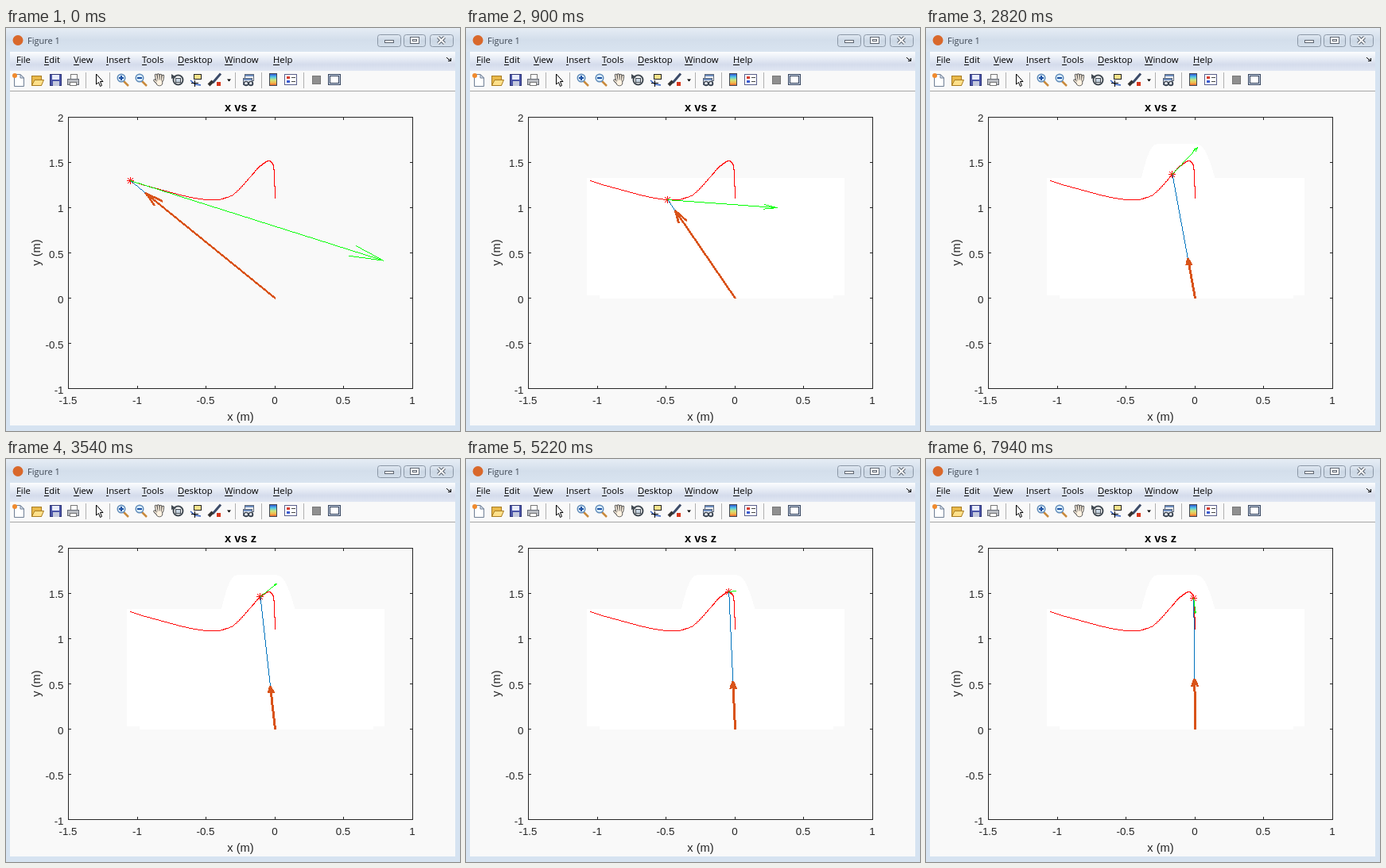
An HTML page with a canvas for the animation above (8000 ms loop, 571 by 508 pixels).

```html
<!DOCTYPE html>
<html lang="en">
<head>
<meta charset="utf-8">
<title>Figure 1</title>
<style>
  html, body { margin: 0; width: 100%; height: 100%; overflow: hidden; background: #d6e3f1; }
  canvas { display: block; }
</style>
</head>
<body>
<canvas id="stage" width="571" height="508"></canvas>
<script>
const W = 571, H = 508, LOOP = 8000;
const RED = '#f00', GREEN = '#0f0', BLUE = '#0072bd', ORANGE = '#d95319', INK = '#262626';
const UX = 173.2, UY = 114.2;            // pixels per metre
const OX = 338, OY = 340;                // data origin
const stage = document.getElementById('stage').getContext('2d');
let g = stage;

// ---------- drawing helpers ----------
function rect(c, x, y, w, h) { g.fillStyle = c; g.fillRect(x, y, w, h); }

function frame(c, x, y, w, h) {
  g.strokeStyle = c; g.lineWidth = 1;
  g.strokeRect(x + .5, y + .5, w - 1, h - 1);
}

function box(fill, edge, x, y, w, h) { rect(fill, x, y, w, h); frame(edge, x, y, w, h); }

function poly(pts, fill, stroke, width = 1, open = false) {
  g.beginPath();
  for (let i = 0; i < pts.length; i += 2) g.lineTo(pts[i], pts[i + 1]);
  if (!open) g.closePath();
  if (fill) { g.fillStyle = fill; g.fill(); }
  if (stroke) { g.strokeStyle = stroke; g.lineWidth = width; g.stroke(); }
}

function disc(x, y, r, fill, stroke, width = 1) {
  g.beginPath(); g.arc(x, y, r, 0, 7);
  if (fill) { g.fillStyle = fill; g.fill(); }
  if (stroke) { g.strokeStyle = stroke; g.lineWidth = width; g.stroke(); }
}

function text(s, x, y, font, c = INK, align = 'left') {
  g.font = font; g.fillStyle = c; g.textAlign = align;
  g.fillText(s, x, y);
}

function shade(y0, y1, ...stops) {
  const s = g.createLinearGradient(0, y0, 0, y1);
  stops.forEach((c, i) => s.addColorStop(i / (stops.length - 1), c));
  return s;
}

// hard-edged line, thickened across its minor axis
function line(c, x0, y0, x1, y1, w = 1) {
  const dx = x1 - x0, dy = y1 - y0, flat = Math.abs(dx) >= Math.abs(dy);
  const n = Math.max(1, Math.ceil(Math.max(Math.abs(dx), Math.abs(dy)))), o = w >> 1;
  g.fillStyle = c;
  for (let i = 0; i <= n; i++) {
    const x = Math.round(x0 + dx * i / n), y = Math.round(y0 + dy * i / n);
    if (flat) g.fillRect(x, y - o, 1, w); else g.fillRect(x - o, y, w, 1);
  }
}

// arrow whose head is square to the shaft in data units
function arrow(c, x, y, dx, dy, size, w) {
  const tx = x + dx, ty = y + dy, u = dx / UX, v = dy / UY;
  line(c, x, y, tx, ty, w);
  for (const s of [-.25, .25])
    line(c, tx, ty, tx - size * (u + s * v) * UX, ty - size * (v - s * u) * UY, w);
}

// ---------- motion ----------
// monotone cubic through [x, y] points
function curve(pts) {
  const last = pts.length - 1;
  const secant = i => (pts[i + 1][1] - pts[i][1]) / (pts[i + 1][0] - pts[i][0]);
  const slope = i => {
    if (i === 0) return secant(0);
    if (i === last) return secant(last - 1);
    const a = secant(i - 1), b = secant(i);
    return a * b <= 0 ? 0 : 2 * a * b / (a + b);
  };
  return x => {
    let i = 0;
    while (i < last - 1 && x > pts[i + 1][0]) i++;
    const [x0, y0] = pts[i], [x1, y1] = pts[i + 1];
    const h = x1 - x0, s = (x - x0) / h, q = 1 - s;
    return y0 * q * q * (1 + 2 * s) + y1 * s * s * (3 - 2 * s)
         + h * s * q * (slope(i) * q - slope(i + 1) * s);
  };
}

const pathY = curve([[156, 192], [180, 199.6], [262, 216.4], [283, 211], [291, 204.6],
  [309.5, 184], [320.5, 172.6], [331, 167], [336, 173.5], [338.2, 215]]);

const falling = (n, mid, width) => 1 / (1 + Math.exp((n - mid) / width));

// the gap to the goal decays, faster at first
const gap = n => 124.4 * Math.exp(-.061 * n + .0648 * Math.log1p(Math.exp((10.6 - n) / 1.8)));
const decay = n => .061 + .036 * falling(n, 10.6, 1.8);
const reach = n => .275 + .0016 * n + .62 * falling(n, 14.4, 1.96);

function pose(n) {
  const x = 338.2 - gap(n), y = pathY(x), e = .05;
  const vx = 18 * gap(n) * decay(n);
  return { x, y, vx, vy: vx * (pathY(x + e) - pathY(x - e)) / (2 * e) };
}

// [start, first step, interval]
const TEMPO = [[-60, 0, 120], [3300, 28, 60], [3420, 30, 120], [7640, 65, 100]];
function stepAt(t) {
  const [start, first, interval] = TEMPO.findLast(p => t >= p[0]);
  return first + Math.floor((t - start) / interval);
}

// ---------- window ----------
function titleBar() {
  rect('#d6e3f1', 0, 0, W, H);
  rect(shade(0, 30, '#e6edf5', '#d3deeb', '#d9e4f0'), 0, 0, W, 30);
  disc(15, 15.5, 6.5, '#d9682b');
  text('Figure 1', 27, 20, '11px "Open Sans", sans-serif', '#3f4854');
  for (const [x, w] of [[467, 30], [500, 28], [533, 30]]) {
    g.beginPath(); g.roundRect(x + .5, 8.5, w - 1, 15, 3);
    g.fillStyle = shade(8, 24, '#e3ebf4', '#cbd7e4', '#d5e0ec'); g.fill();
    g.strokeStyle = '#8b97a6'; g.lineWidth = 1; g.stroke();
  }
  box('#fff', '#5c6470', 476, 15, 12, 4);
  box('#fff', '#5c6470', 508, 11, 12, 9);
  frame('#5c6470', 511, 14, 6, 3);
  for (const [c, w] of [['#5c6470', 4], ['#fff', 2]])
    for (const s of [-4, 4]) poly([547.5 - s, 11.5, 547.5 + s, 19.5], null, c, w, true);
}

function menuBar() {
  rect(shade(30, 54, '#fcfdfe', '#e8edf6', '#d5dcec', '#e1e7f3'), 5, 30, 560, 24);
  const names = { File: 13, Edit: 48, View: 85, Insert: 126, Tools: 171, Desktop: 216, Window: 275, Help: 336 };
  for (const [s, x] of Object.entries(names)) {
    text(s, x, 44, '11.3px "Open Sans", sans-serif', '#000');
    rect('#000', x, 46, Math.round(g.measureText(s[0]).width), 1);
  }
  line('#000', 554, 37, 559, 41);
  rect('#000', 556, 41, 4, 1); rect('#000', 559, 38, 1, 4);
}

function magnifier(x, plus) {
  poly([x + 9, 67, x + 15, 73], null, '#c98a3c', 2.5, true);
  disc(x + 6, 63, 4.8, '#d8ecfb', '#5b87b5', 1.4);
  rect('#1b4fa0', x + 3, 62, 6, 2);
  if (plus) rect('#1b4fa0', x + 5, 60, 2, 6);
}

function hand(x, y) {
  g.lineCap = 'round';
  for (const [c, w] of [['#4b4b4b', 3.4], ['#fff3e2', 1.6]]) {
    for (let i = 0; i < 4; i++)
      poly([x - 3 + i * 2.2, y, x - 4.5 + i * 3, y - 6 - Math.sin(i + .6)], null, c, w, true);
    poly([x - 2, y + 4, x - 6, y], null, c, w, true);
    disc(x, y + 3, 2.6 + w / 2, c);
  }
  g.lineCap = 'butt';
}

function toolBar() {
  rect('#f9f9f9', 5, 54, 560, 447);
  rect('#a6a6a6', 5, 79, 560, 1);
  for (const x of [100, 130, 288, 321, 374]) rect('#b0b0b0', x, 56, 1, 20);

  // new, open, save, print
  poly([10.5, 58.5, 18, 58.5, 22.5, 63, 22.5, 73.5, 10.5, 73.5], '#fff', '#6f7f95');
  poly([18, 58.5, 18, 63, 22.5, 63], '#dce5f0', '#6f7f95');
  disc(11, 60, 3, '#f08a2c');
  box('#e9b94a', '#a87c22', 32, 60, 13, 13);
  poly([32.5, 72.5, 36, 65.5, 47.5, 65.5, 44.5, 72.5], '#ffe08a', '#a87c22');
  box('#4b55a8', '#2d3475', 55, 58, 15, 15);
  rect('#e8ecfa', 58, 59, 9, 6); rect('#c4c9dc', 59, 67, 8, 6);
  box('#fff', '#777', 81, 58, 9, 7);
  box('#b9bcc2', '#666b75', 77, 64, 15, 8);
  box('#fff', '#777', 80, 68, 9, 5);

  // pointer, zoom, pan
  poly([113.5, 58, 113.5, 71, 116.5, 68.5, 118.5, 73.5, 120.5, 72.5, 118.5, 67.5, 122, 67.5], '#fff', '#000');
  magnifier(139, true);
  magnifier(162, false);
  hand(193, 66);

  // rotate
  disc(216.5, 65.5, 6, null, '#424a52', 2);
  poly([208, 58, 208, 64, 214, 62], '#424a52');
  box('#c9d6e2', '#424a52', 213, 63, 7, 6);

  // data cursor
  box('#f7e38a', '#222', 236, 58, 10, 7);
  poly([232, 66, 238, 71, 245, 72], null, '#2b57b8', 1.4, true);
  rect('#000', 233, 69, 9, 1); rect('#000', 237, 66, 1, 8);

  // brush
  poly([270, 57.5, 260, 69], null, '#3c4b68', 3, true);
  poly([255, 72, 260, 67], null, '#333', 4, true);
  rect('#d5361b', 265, 68, 5, 5);
  poly([278, 64.5, 283, 64.5, 280.5, 67.5], '#000');

  // link
  for (const [x, y] of [[300, 58], [298, 63]]) {
    box('#f4f7fb', '#5a6577', x, y, 12, 9);
    rect('#6f8fc0', x + 1, y + 1, 10, 2);
  }
  for (const x of [302, 308]) disc(x, 70, 2.6, null, '#3b4450', 1.4);

  // colour bar and legend
  box(shade(58, 73, '#3558d4', '#4fc5e8', '#c8e47c', '#f6b84a', '#e0482e'), '#3f4550', 331, 57, 10, 16);
  box('#fff', '#5a5f8a', 350, 58, 16, 14);
  for (const [c, y] of [['#d63c2c', 61], ['#3b5bd0', 66]]) {
    rect(c, 353, y, 4, 3); rect('#444', 359, y + 1, 5, 1);
  }

  // hide and show tools
  box('#8f8f8f', '#777', 385, 60, 11, 11);
  box('#c9d5e6', '#35435c', 405, 58, 16, 14);
  box('#fff', '#35435c', 407, 60, 12, 10);
}

function axes() {
  const face = 'px "Liberation Sans", Arial, sans-serif';
  const small = 13.33 + face, label = 14.67 + face, tick = 3;
  frame(INK, 78, 112, 434, 343);
  for (let i = 0; i < 6; i++) {
    const x = Math.round(78 + i * 86.6);
    rect(INK, x, 454 - tick, 1, tick); rect(INK, x, 113, 1, tick);
    text(String(-1.5 + i / 2), x, 474, small, INK, 'center');
  }
  for (let i = 0; i < 7; i++) {
    const y = Math.round(112 + i * 57);
    rect(INK, 79, y, tick, 1); rect(INK, 511 - tick, y, tick, 1);
    text(String(2 - i / 2), 72.5, Math.round(118 + i * 57.17), small, INK, 'right');
  }
  text('x vs z', 295, 105, 'bold ' + label, '#000', 'center');
  text('x (m)', 295, 495, label, INK, 'center');
  g.save();
  g.translate(43, 283); g.rotate(-Math.PI / 2);
  text('y (m)', 0, 0, label, INK, 'center');
  g.restore();
}

// ---------- plot ----------
// white area uncovered as the arrows sweep
function swept(step) {
  if (!step) return;
  rect('#fff', 152, 189, 324, 148);
  rect('#fff', 168, 337, 294, 4);
  let top = 189;
  for (let n = 0; n <= step; n++) {
    const p = pose(n);
    top = Math.min(top, Math.round(p.y + p.vy) - 1);
  }
  for (let y = Math.max(top, 146); y < 189; y++) {
    const r = Math.sqrt(y - 146), left = Math.round(290 - 2.9 * r);
    rect('#fff', left, y, Math.round(341 + 3.4 * r) - left, 1);
  }
}

function trajectory() {
  let a = pose(0);
  for (let n = .25; n < 130; n += .25) {
    const b = pose(n);
    line(RED, a.x, a.y, b.x, b.y);
    a = b;
  }
}

function star(x, y) {
  line(RED, x - 4, y, x + 4, y);
  line(RED, x, y - 4, x, y + 4);
  for (const s of [-3, 3]) line(RED, x - 3, y - s, x + 3, y + s);
}

function plot(step) {
  const { x, y, vx, vy } = pose(step);
  const dx = (x - OX) * reach(step), dy = (y - OY) * reach(step);
  star(Math.round(x), Math.round(y));
  line(BLUE, OX, OY, x, y);
  arrow(ORANGE, OX, OY, dx, dy, .18 - .055 * Math.hypot(dx / UX, dy / UY), 3);
  arrow(GREEN, x, y, vx, vy, .12, 1);
}

function layer(...parts) {
  const c = document.createElement('canvas');
  c.width = W; c.height = H;
  g = c.getContext('2d');
  parts.forEach(part => part());
  g = stage;
  return c;
}

const back = layer(titleBar, menuBar, toolBar);
const front = layer(axes, trajectory);

function draw(time) {
  const step = stepAt(time % LOOP);
  g.drawImage(back, 0, 0);
  swept(step);
  g.drawImage(front, 0, 0);
  plot(step);
}

let start;
function tick(now) {
  start ??= now;
  draw(now - start);
  requestAnimationFrame(tick);
}
draw(0);
requestAnimationFrame(tick);
</script>
</body>
</html>
```
